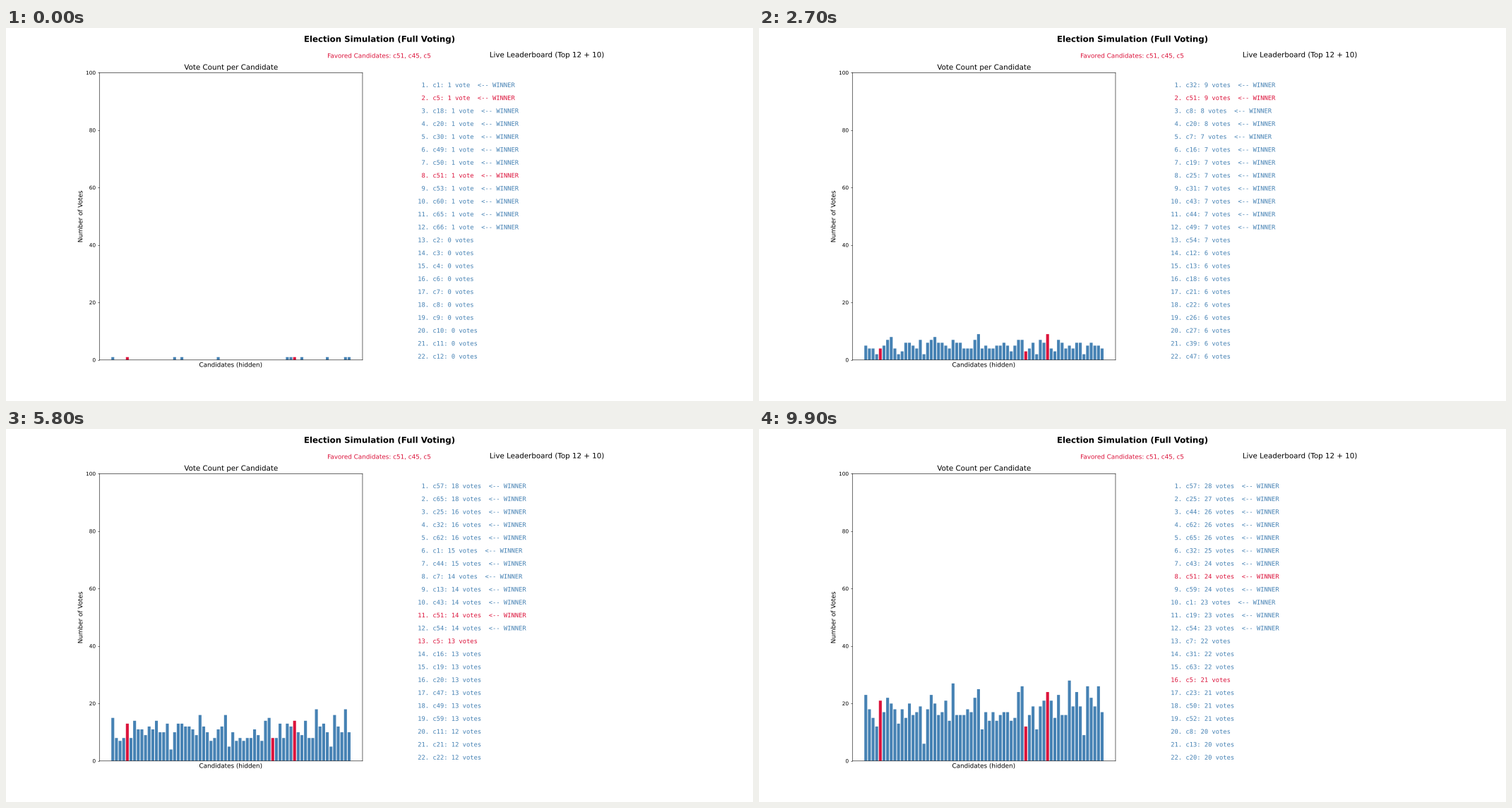
A matplotlib script that plays this animation: 1058 by 529 pixels, repeating every 10000 ms.

```python
import numpy as np
import matplotlib.pyplot as plt
from matplotlib import patheffects
from matplotlib.animation import FuncAnimation

# Subpixel placement for shapes and outlined text
plt.rcParams.update({
    "font.family": "DejaVu Sans",
    "text.hinting": "none",
    "path.snap": False,
    "path.effects": [patheffects.Normal()],
})

BALLOTS = 100
CANDIDATES = 66
SEATS = 12
ROWS = SEATS + 10
FAVORED = [51, 45, 5]
BLUE, RED = "steelblue", "crimson"

FIRST_BALLOT = [1, 5, 18, 20, 30, 49, 50, 51, 53, 60, 65, 66]
LEADERS = [57, 25, 44, 62, 65, 32, 43, 51, 59, 1, 19,
           54, 7, 31, 63, 5, 23, 50, 52, 8, 13, 20]
# Final votes as a curve over the rank
RANK_KNOTS = [1, 2, 5, 7, 22, 33, 51, 59, 64, 65, 66]
VOTE_KNOTS = [28, 27, 26, 24.8, 20.1, 18.1, 16, 14, 11, 9, 6]


def count_votes():
    """Running totals; every ballot holds SEATS different candidates."""
    rng = np.random.default_rng(7)
    rest = np.setdiff1d(ids, LEADERS)
    ranking = np.concatenate([LEADERS, rng.permutation(rest)]) - 1
    final = np.zeros(CANDIDATES, int)
    final[ranking] = np.interp(ids, RANK_KNOTS, VOTE_KNOTS).astype(int)

    ballots = np.zeros((BALLOTS, CANDIDATES), int)
    ballots[0, np.array(FIRST_BALLOT) - 1] = 1
    names = rng.permutation(CANDIDATES)
    votes = np.repeat(names, (final - ballots[0])[names])
    # deal like cards, so no ballot repeats a name
    order = rng.permutation(np.arange(1, BALLOTS))
    ballots[order[np.arange(len(votes)) % len(order)], votes] = 1
    return ballots.cumsum(axis=0)


def color(c):
    return RED if c in FAVORED else BLUE


ids = np.arange(1, CANDIDATES + 1)
totals = count_votes()

fig, (chart, board) = plt.subplots(1, 2, figsize=(20, 10), dpi=52.9)
fig.subplots_adjust(left=0.125, right=0.9, bottom=0.11, top=0.88, wspace=0.2)
fig.suptitle("Election Simulation (Full Voting)", fontsize=16, fontweight="bold")
fig.text(0.5, 0.92, "Favored Candidates: " + ", ".join(f"c{c}" for c in FAVORED),
         ha="center", fontsize=12, color=RED)

bars = chart.bar(ids, totals[0], color=[color(c) for c in ids])
chart.set_ylim(0, 100)
chart.set_xticks([])
chart.set_title("Vote Count per Candidate", fontsize=14)
chart.set_xlabel("Candidates (hidden)", fontsize=12)
chart.set_ylabel("Number of Votes", fontsize=12)

board.axis("off")
board.set_title("Live Leaderboard (Top 12 + 10)", fontsize=14, pad=30)
lines = [board.text(0.01, 0.95 - 0.045 * i, "", fontsize=11.96,
                    family="DejaVu Sans Mono", transform=board.transAxes)
         for i in range(ROWS)]


def update(frame):
    votes = totals[frame]
    for bar, v in zip(bars, votes):
        bar.set_height(v)
    ranking = sorted(ids, key=lambda c: (-votes[c - 1], c))
    for rank, (line, c) in enumerate(zip(lines, ranking), 1):
        v = votes[c - 1]
        label = f"{rank:2d}. c{c}: {v} vote{'' if v == 1 else 's'}"
        if rank <= SEATS:
            label += "  <-- WINNER"
        line.set_text(label)
        line.set_color(color(c))
    return [*bars, *lines]


anim = FuncAnimation(fig, update, frames=BALLOTS, interval=100, repeat=True)
plt.show()
```
